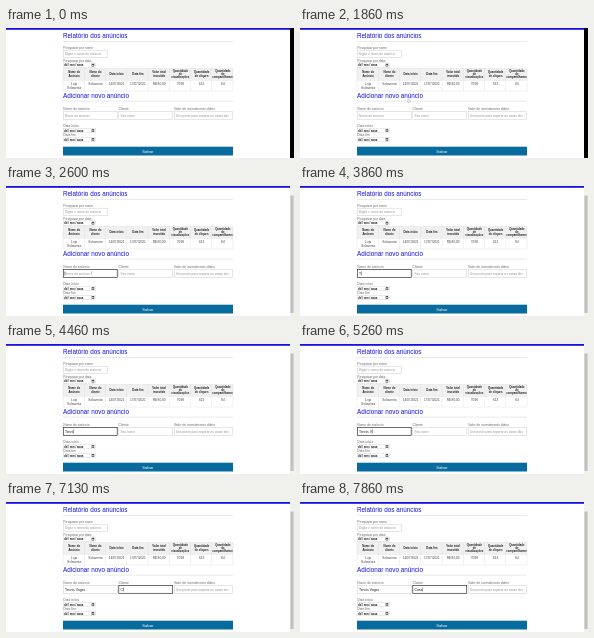
These frames come from a looping animation (288 px wide and 130 px high, 8 s). An HTML page with a canvas:

```html
<!DOCTYPE html>
<html lang="pt-BR">
<head>
<meta charset="utf-8">
<title>Relatório dos anúncios</title>
<style>
html, body { margin: 0; width: 100%; height: 100%; overflow: hidden; background: #fff; }
canvas { display: block; width: 288px; height: 130px; }
</style>
</head>
<body>
<canvas id="stage"></canvas>
<script>
const W = 288, H = 130, LOOP = 8000;
const canvas = document.getElementById('stage');
const ctx = canvas.getContext('2d');
const ratio = window.devicePixelRatio || 1;
canvas.width = W * ratio;
canvas.height = H * ratio;
ctx.scale(ratio, ratio);

const FAMILY = '"Liberation Sans", Arial, sans-serif';
const BLUE = '#1712e2', GREY = '#666', HINT = '#929292', DARK = '#222';
const BLINK = 530;

const columns = [
  [['Nome do', 'Anúncio'], ['Loja', 'Solaventa']],
  [['Nome do', 'cliente'], ['Solaventa']],
  [['Data início'], ['14/07/2021']],
  [['Data fim'], ['17/07/2021']],
  [['Valor total', 'investido'], ['R$ 80,00']],
  [['Quantidade', 'de', 'visualizações'], ['7098']],
  [['Quantidade', 'de cliques'], ['613']],
  [['Quantidade', 'de', 'compartilhamentos'], ['84']]
];
const COL = 170 / columns.length;

const adName = {
  text: 'Tennis Vagas', focus: 2600, blur: 6330,
  times: [3860, 4000, 4130, 4330, 4460, 4730, 4860, 5260, 5460, 5730, 5860, 6060]
};
const client = { text: 'Casa', focus: 6330, blur: LOOP, times: [7130, 7330, 7660, 7860] };

// Pointer waypoints: time, x, y
const path = [[1730, 144, 60], [1860, 108, 71], [2330, 85, 87], [2860, 85, 87]];

function rect(x, y, w, h, color) {
  ctx.fillStyle = color;
  ctx.fillRect(x, y, w, h);
}

function frame(x, y, w, h, color, line = 0.5) {
  ctx.strokeStyle = color;
  ctx.lineWidth = line;
  ctx.strokeRect(x, y, w, h);
}

function label(text, x, y, size = 3.35, color = GREY, align = 'left', weight = 400) {
  ctx.font = `${weight} ${size}px ${FAMILY}`;
  ctx.textAlign = align;
  ctx.fillStyle = color;
  ctx.fillText(text, x, y);
}

function heading(text, y) {
  label(text, 57, y, 6.35, BLUE);
  rect(57, y + 3, 170, 0.5, '#d5d5d5');
}

function dateField(y) {
  frame(57.3, y, 32, 4.4, '#ccc', 0.4);
  label('dd / mm / aaaa', 58, y + 3.2, 2.8, DARK, 'left', 700);
  rect(85.7, y + 0.9, 2.5, 2.6, '#222');
  rect(86.2, y + 1.8, 1.5, 1.2, '#fff');
}

function field(x, w, hint, input, t = 0) {
  const focused = input && t >= input.focus && t < input.blur;
  const keys = input ? input.times.filter(at => at <= t) : [];
  const value = input ? input.text.slice(0, keys.length) : '';
  frame(x + 0.3, 83.5, w - 0.6, 7.8, focused ? '#222' : '#ccc', focused ? 0.65 : 0.5);
  label(value || hint, x + 2, 88.6, value ? 3.4 : 3.2, value ? DARK : HINT);
  if (!focused) return;
  const idle = t - (keys.length ? keys[keys.length - 1] : input.focus);
  if (Math.floor(idle / BLINK) % 2) return;
  const end = value ? ctx.measureText(value).width + 0.2 : -0.3;
  rect(x + 2 + end, 85.4, 0.4, 4.1, '#111');
}

function table() {
  rect(57, 40.3, 170, 12, '#f0f0f0');
  columns.forEach(([head, body], i) => {
    const left = 57 + i * COL, x = left + COL / 2 + 0.5;
    const top = 47.1 - (head.length - 1) * 1.7;
    ctx.save();
    ctx.beginPath();
    ctx.rect(left, 40, COL, 24);
    ctx.clip();
    head.forEach((s, n) => {
      const wide = s.length > 13;
      label(s, wide ? left + 0.5 : x, top + n * 3.3, 2.8, DARK, wide ? 'left' : 'center', 700);
    });
    body.forEach((s, n) => label(s, x, 57.3 + n * 3.5, 3.2, '#444', 'center'));
    ctx.restore();
  });
  for (let i = 0; i <= columns.length; i++) rect(56.8 + i * COL, 40.3, 0.4, 22.7, '#ddd');
  for (const y of [40.3, 52.3, 63]) rect(57, y - 0.2, 170, 0.4, '#ddd');
}

function pointer(t) {
  const next = path.findIndex(p => p[0] > t);
  if (next < 1) return;
  const [t0, x0, y0] = path[next - 1], [t1, x1, y1] = path[next];
  const k = (t - t0) / (t1 - t0);
  const x = x0 + (x1 - x0) * k, y = y0 + (y1 - y0) * k;
  if (t >= 2330) {
    rect(x, y - 1.8, 0.4, 3.6, '#777');
    return;
  }
  ctx.beginPath();
  ctx.moveTo(x, y);
  ctx.lineTo(x, y + 4);
  ctx.lineTo(x + 1, y + 3.1);
  ctx.lineTo(x + 2.7, y + 2.9);
  ctx.closePath();
  ctx.fillStyle = '#fff';
  ctx.fill();
  ctx.strokeStyle = '#777';
  ctx.lineWidth = 0.35;
  ctx.stroke();
}

function scrollbar(t) {
  const shown = t >= adName.focus;
  rect(284, 0, 4, H, shown ? '#f1f1f1' : '#000');
  if (shown) rect(284.4, 9.5, 3.2, 117.5, '#c1c1c1');
}

function draw(now) {
  const t = now % LOOP;
  rect(0, 0, W, H, '#fff');
  rect(0, 0, 284, 1.8, BLUE);

  heading('Relatório dos anúncios', 10.3);
  label('Pesquisar por nome', 57.3, 20.8);
  frame(57.3, 22.2, 44.4, 7.5, '#ccc');
  label('Digite o nome do anúncio', 59, 27.1, 3.2, HINT);
  label('Pesquisar por data', 57.3, 33.9);
  dateField(34.9);
  table();

  heading('Adicionar novo anúncio', 69.8);
  label('Nome do anúncio', 57.3, 81.7);
  label('Cliente', 112.5, 81.7);
  label('Valor de investimento diário', 168, 81.7);
  field(57, 54.5, 'Nome do anúncio', adName, t);
  field(112.5, 54.5, 'Seu nome', client, t);
  field(168, 59, 'Use ponto para separar as casas dec');
  label('Data início', 57.3, 99.2);
  dateField(100.4);
  label('Data fim', 57.3, 108);
  dateField(109.3);

  rect(57, 118.7, 170, 8.8, '#086b9e');
  label('Salvar', 142, 124.5, 4, '#fff', 'center');

  scrollbar(t);
  pointer(t);
}

const start = performance.now();
function tick() {
  draw(performance.now() - start);
  requestAnimationFrame(tick);
}
tick();
</script>
</body>
</html>
```
